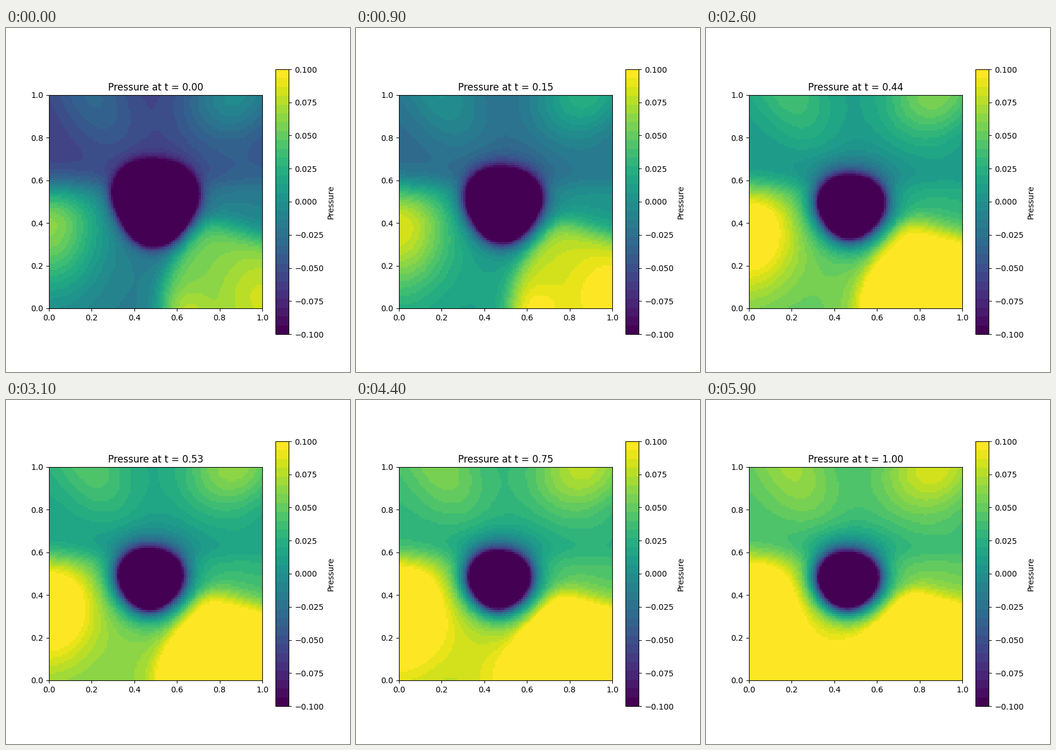
Recreate the animation shown at these times as a matplotlib script. Size 600 px wide and 600 px high, loop 6 s.

```python
import numpy as np
import matplotlib.pyplot as plt
from matplotlib.animation import FuncAnimation

FRAMES, INTERVAL, CELLS, BANDS = 60, 100, 100, 30
FLOOR = -.093  # upper edge of the darkest colour band

centres = (np.arange(CELLS) + .5) / CELLS
X, Y = np.meshgrid(centres, centres)


def bell(d, width):
    return np.exp(-.5 * (d / width) ** 2)


def step(d, width):
    """Smooth 0 to 1 transition centred on d = 0."""
    return 1 / (1 + np.exp(-d / width))


def mix(a, b, s):
    return a + (b - a) * s


def settle(t, tau):
    """Exponential approach, scaled to run from 0 to 1."""
    return (1 - np.exp(-t / tau)) / (1 - np.exp(-1 / tau))


def starting_field():
    # Cool upper half, milder lower half.
    field = -.062 + .046 * step(.58 - Y, .03)
    # Two lobes hanging from the top edge, leaning inwards.
    depth = 1 - Y
    field += .03 * bell(X - .2 - .35 * depth, .13) * bell(depth, .2)
    field += .058 * bell(X - .87 + .2 * depth, .17) * bell(depth, .17)
    # Warm lobe on the left wall, with a longer tail downwards.
    field += .078 * bell(X, .165) * bell(Y - .39, np.where(Y > .39, .13, .22))
    # Warm plateau in the lower right corner with two crests.
    left_edge = .52 + 1.2 * Y ** 2
    top_edge = .41 - .35 * (X - .78)
    field += .071 * step(X - left_edge, .03) * step(top_edge - Y, .035)
    field += .027 * bell(X - 1, .15) * bell(Y - .05, .17)
    field += .02 * bell(X - .65, .07) * bell(Y + .02, .08)
    # Slight lift on the right wall.
    field += .015 * bell(X - 1, .2) * bell(Y - .65, .08)
    return field


base = starting_field()
rise = (.104 - .016 * X - (.016 + .006 * X) * bell(Y - .53, .12)
        + .03 * bell(X - .5, .15) * bell(Y, .2))


def pressure(t):
    outer = base + rise * settle(t, .9 - .45 * Y)

    # The central low shrinks, drifts and becomes rounder.
    s = settle(t, .35)
    dx = X - mix(.4975, .465, (s + t) / 2)
    dy = Y - mix(.4975, .464, s)
    angle = np.arctan2(dy, dx)
    edge = (mix(.203, .134, s)
            + .01 * np.cos(angle - np.radians(100))
            + mix(-.004, .004, s) * np.cos(2 * angle)
            + mix(.013, .004, s) * np.cos(3 * (angle - np.radians(25))))
    width = mix(.025, .045, s)
    return outer - (outer - FLOOR) * np.exp((edge - np.hypot(dx, dy)) / width)


fig, ax = plt.subplots(figsize=(6, 6), dpi=100)
image = ax.imshow(pressure(0), origin="lower", extent=(0, 1, 0, 1),
                  cmap=plt.get_cmap("viridis", BANDS), vmin=-.1, vmax=.1,
                  interpolation="nearest")
fig.colorbar(image, ax=ax, label="Pressure")
title = ax.set_title("Pressure at t = 0.00")


def update(i):
    t = i / (FRAMES - 1)
    image.set_data(pressure(t))
    title.set_text(f"Pressure at t = {t:.2f}")
    return image, title


anim = FuncAnimation(fig, update, frames=FRAMES, interval=INTERVAL,
                     repeat=True, repeat_delay=0)
plt.show()
```
